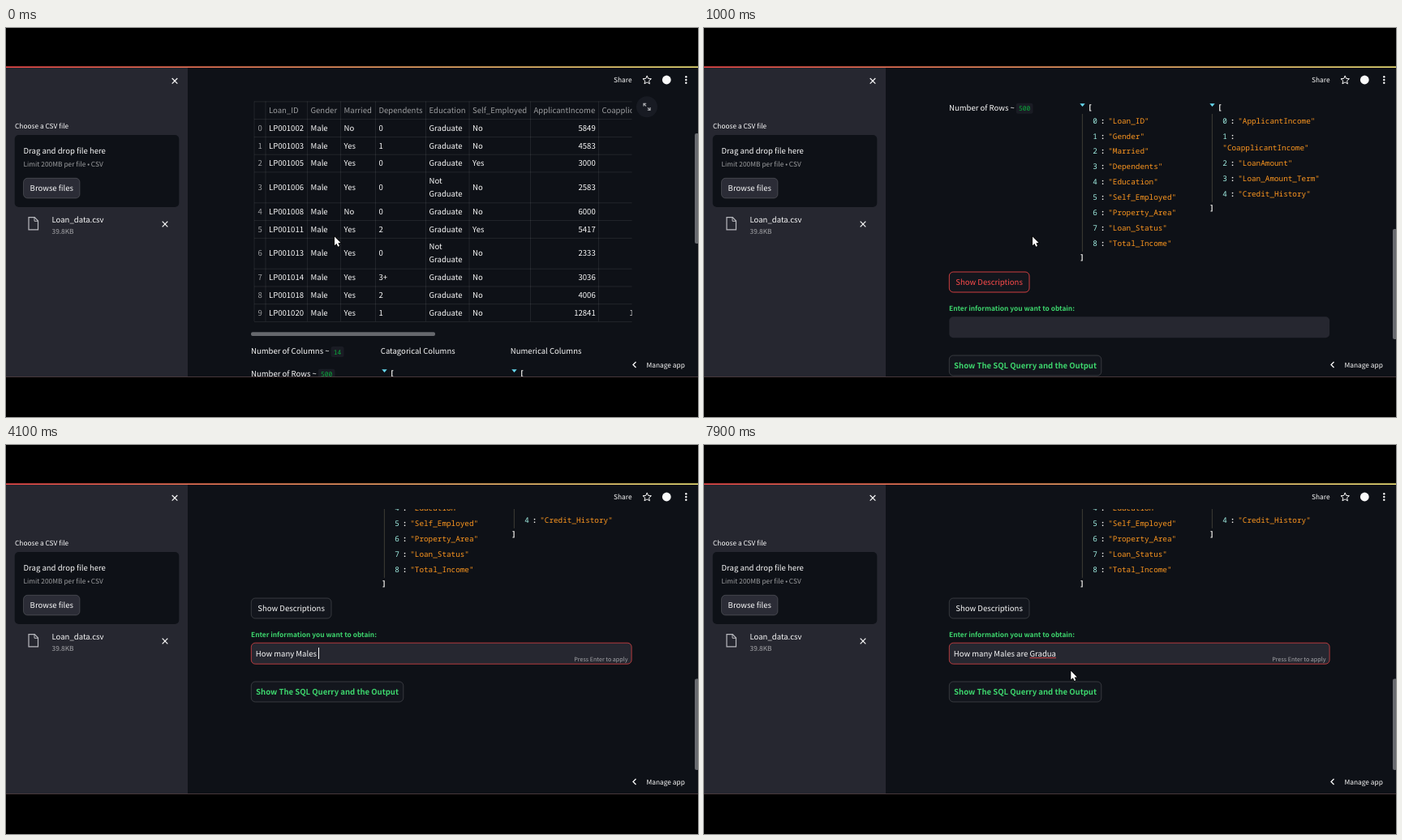
Write an HTML page with a canvas that moves like this. It is 853x480 px and loops after 8000 ms.

```html
<!DOCTYPE html>
<html lang="en">
<head>
<meta charset="utf-8">
<title>Loan data explorer</title>
<style>
html, body { margin: 0; width: 100%; height: 100%; overflow: hidden; background: #000; }
canvas { display: block; }
</style>
</head>
<body>
<canvas id="stage" width="853" height="480"></canvas>
<script>
const ctx = document.getElementById('stage').getContext('2d');
const LOOP = 8000, STEP = 100;
const SANS = '"Noto Sans CJK JP", "Noto Sans CJK SC", "Noto Sans CJK", "Noto Sans", sans-serif';
const MONO = '"Noto Sans Mono", "DejaVu Sans Mono", monospace';
const BODY = 9.55, SMALL = 8.36, TINY = 7.16;
const WHITE = '#fafafa', FAINT = 'rgba(250,250,250,.6)', EDGE = 'rgba(250,250,250,.2)';
const PAGE = '#0e1117', PANEL = '#262730', GREEN = '#3dd56d', RED = '#ff4b4b';

const SCROLL = [[100, 0], [400, 67], [700, 171.5], [1000, 328], [1250, 420], [1400, 440]];
const CLICK = 1500, UNDERLINE = 7100, POINTER_BACK = 7900;
const TYPED = [
  [CLICK, ''], [2000, 'H'], [2200, 'Ho'], [2300, 'How'], [2400, 'How '], [2600, 'How ma'],
  [2700, 'How man'], [2800, 'How many'], [2900, 'How many '], [3300, 'How many M'],
  [3500, 'How many Ma'], [3700, 'How many Mal'], [3900, 'How many Male'], [4100, 'How many Males '],
  [4300, 'How many Males a'], [4500, 'How many Males ar'], [4600, 'How many Males are'],
  [4700, 'How many Males are '], [4800, 'How many Males are g'], [5000, 'How many Males are '],
  [5700, 'How many Males are G'], [5800, 'How many Males are Gr'], [6000, 'How many Males are Gra'],
  [6200, 'How many Males are Grad'], [6300, 'How many Males are Gradua']
];

const COLUMNS = [306, 320, 371.5, 412.5, 455.5, 517.5, 571, 646.5, 730.5];
const HEADS = ['', 'Loan_ID', 'Gender', 'Married', 'Dependents', 'Education', 'Self_Employed', 'ApplicantIncome', 'CoapplicantIncome'];
const ROWS = [
  '02 No 0 G No 5849', '03 Yes 1 G No 4583', '05 Yes 0 G Yes 3000', '06 Yes 0 N No 2583',
  '08 No 0 G No 6000', '11 Yes 2 G Yes 5417', '13 Yes 0 N No 2333', '14 Yes 3+ G No 3036',
  '18 Yes 2 G No 4006', '20 Yes 1 G No 12841'
].map(row => row.split(' '));
const CATEGORICAL = ['Loan_ID', 'Gender', 'Married', 'Dependents', 'Education', 'Self_Employed', 'Property_Area', 'Loan_Status', 'Total_Income'];
const NUMERICAL = ['ApplicantIncome', 'CoapplicantIncome', 'LoanAmount', 'Loan_Amount_Term', 'Credit_History'];

// y is the middle of the capitals
function text(str, x, y, { size = BODY, color = WHITE, align = 'left', weight = 400, family = SANS } = {}) {
  ctx.font = `${weight} ${size}px ${family}`;
  ctx.textRendering = 'geometricPrecision';
  ctx.textAlign = align;
  ctx.fillStyle = color;
  ctx.fillText(str, x, y + (family === SANS ? size * .38 : size * .33));
  return ctx.measureText(str).width;
}

function rect(x, y, w, h, color) {
  ctx.fillStyle = color;
  ctx.fillRect(x, y, w, h);
}

function box(x, y, w, h, fill, edge, radius = 5) {
  ctx.beginPath();
  ctx.roundRect(x, y, w, h, radius);
  ctx.fillStyle = fill;
  ctx.fill();
  if (edge) stroke(edge, .8);
}

function stroke(color, width) {
  ctx.strokeStyle = color;
  ctx.lineWidth = width;
  ctx.stroke();
}

function path(points, close) {
  ctx.beginPath();
  points.forEach(([x, y]) => ctx.lineTo(x, y));
  if (close) ctx.closePath();
}

function line(points, color = WHITE, width = 1.2) {
  path(points);
  stroke(color, width);
}

function disc(x, y, r, color) {
  ctx.beginPath();
  ctx.arc(x, y, r, 0, 2 * Math.PI);
  ctx.fillStyle = color;
  ctx.fill();
}

function cross(x, y) {
  const r = 3.3;
  line([[x - r, y - r], [x + r, y + r]]);
  line([[x - r, y + r], [x + r, y - r]]);
}

function scrollAt(t) {
  if (t <= SCROLL[0][0]) return 0;
  for (let i = 1; i < SCROLL.length; i++) {
    const [t0, s0] = SCROLL[i - 1], [t1, s1] = SCROLL[i];
    if (t <= t1) return s0 + (s1 - s0) * (t - t0) / (t1 - t0);
  }
  return SCROLL[SCROLL.length - 1][1];
}

function drawSidebar() {
  rect(0, 49, 224, 381, PANEL);
  cross(208, 65.3);
  text('Choose a CSV file', 11, 121.3, { size: SMALL });
  box(10.7, 132, 202.6, 89, PAGE);
  text('Drag and drop file here', 21.5, 151);
  text('Limit 200MB per file • CSV', 21.5, 168, { size: SMALL, color: FAINT });
  box(21.5, 185.3, 69.5, 24.7, '#2b2c36', EDGE);
  text('Browse files', 56.3, 197.4, { align: 'center' });
  path([[28, 233.7], [35.3, 233.7], [39.5, 238], [39.5, 248.8], [28, 248.8]], true);
  stroke('#b9babf', 1.2);
  line([[35, 233.7], [35, 238.3], [39.5, 238.3]], '#b9babf', 1);
  text('Loan_data.csv', 56.5, 236);
  text('39.8KB', 56.5, 251, { size: SMALL, color: FAINT });
  cross(196, 242);
}

function drawTable(hovered) {
  const top = 90.5, single = 21.75, double = 37.9, edge = 'rgba(250,250,250,.1)';
  const left = i => COLUMNS[i] + 4;
  ctx.save();
  ctx.beginPath();
  ctx.rect(302, top - 1, 469.5, 274);
  ctx.clip();
  HEADS.forEach((head, i) => text(head, left(i), top + 10.9, { color: FAINT }));
  rect(306, top, 480, .8, edge);
  let y = top + single;
  ROWS.forEach(([id, married, dependents, degree, employed, income], i) => {
    const height = degree === 'N' ? double : single, mid = y + height / 2;
    rect(306, y, 480, .8, edge);
    text(i, 315.8, mid, { color: FAINT, align: 'right' });
    ['LP0010' + id, 'Male', married, dependents].forEach((cell, c) => text(cell, left(c + 1), mid));
    if (degree === 'N') {
      text('Not', left(5), mid - 8);
      text('Graduate', left(5), mid + 8);
    } else {
      text('Graduate', left(5), mid);
    }
    text(employed, left(6), mid);
    text(income, 726.7, mid, { align: 'right' });
    if (i === 9) text('10968', 768.5, mid);
    y += height;
  });
  rect(306, y, 480, .8, edge);
  COLUMNS.forEach(x => rect(x - .4, top, .8, y - top, edge));
  ctx.restore();
  if (!hovered) return;
  box(302, 375.3, 227, 4.6, '#66686d', null, 2);
  disc(790, 97.3, 13, '#181b23');
  for (const d of [-1, 1]) {
    const tip = [790 + 4 * d, 97.3 + 4 * d];
    line([[790 + d, 97.3 + d], tip], '#bfc0c4', 1.1);
    line([[tip[0] - 3.2 * d, tip[1]], tip, [tip[0], tip[1] - 3.2 * d]], '#bfc0c4', 1.1);
  }
}

function drawBadge(value, x, y) {
  const width = String(value).length * 4.8 + 6.4;
  box(x, y - 6.5, width, 13, '#1a1c24', null, 2.5);
  text(value, x + 3.2, y + .5, { size: 8, color: '#09ab3b', family: MONO });
}

function drawList(names, x, y) {
  const mono = { size: 9.33, family: MONO };
  const bold = { ...mono, weight: 700, color: '#f9f8f5' };
  path([[x + 1.3, y - 4.3], [x + 7.7, y - 4.3], [x + 4.5, y - .6]], true);
  ctx.fillStyle = '#66d9ef';
  ctx.fill();
  text('[', x + 11, y, bold);
  let row = y + 17;
  names.forEach((name, i) => {
    text(i, x + 17.3, row, { ...mono, color: '#a1efe4' });
    text(':', x + 26.7, row, bold);
    const wraps = name === 'CoapplicantIncome';
    if (wraps) row += 14.6;
    text(`"${name}"`, x + (wraps ? 17.3 : 36.2), row, { ...mono, color: '#fd971f' });
    row += 18.93;
  });
  rect(x + 3.9, y + 8.5, .8, row - y - 17.5, '#49483e');
  text(']', x + 1.3, row - 2, bold);
}

function drawInput(t) {
  const focus = Math.min(1, Math.max(0, (t - CLICK) / 200));
  box(302.3, 684.2, 468.8, 26, PANEL, focus ? `rgba(255,75,75,${focus * .85})` : null);
  if (t < CLICK) return;
  const [since, typed] = TYPED.filter(([at]) => at <= t).pop();
  const x = 307.7, mid = 697;
  const width = text(typed, x, mid);
  if (typed) text('Press Enter to apply', 766.5, 703.8, { size: TINY, color: FAINT, align: 'right' });
  if (t >= UNDERLINE) {
    ctx.font = `400 ${BODY}px ${SANS}`;
    const start = x + ctx.measureText('How many Males are ').width;
    rect(start, 702.2, x + width - start, 1, '#d8474a');
  }
  const shown = Math.floor((t - since) / 500) % 2 === 0;
  if (shown) rect(Math.round(x + width), 690, 1, 14, t < CLICK + 200 ? '#b0b1b5' : WHITE);
}

function drawPage(t, scroll) {
  ctx.save();
  ctx.beginPath();
  ctx.rect(224, 79, 624, 351);
  ctx.clip();
  ctx.translate(0, -scroll);
  drawTable(scroll < 122);
  text('Number of Columns ~', 302, 398.8);
  drawBadge(14, 400.6, 399.4);
  text('Number of Rows ~', 302, 426.3);
  drawBadge(500, 384.7, 427.2);
  text('Catagorical Columns', 461.8, 398.8);
  text('Numerical Columns', 621.8, 398.8);
  drawList(CATEGORICAL, 462, 425.5);
  drawList(NUMERICAL, 622, 425.5);
  const focused = t < CLICK;
  box(302.3, 629, 98.7, 25, '#13161d', focused ? RED : EDGE);
  text('Show Descriptions', 351.6, 641.3, { align: 'center', color: focused ? RED : WHITE });
  text('Enter information you want to obtain:', 302, 673.4, { size: SMALL, color: GREEN, weight: 600 });
  drawInput(t);
  box(302.3, 732, 187.5, 25, '#13161d', EDGE);
  text('Show The SQL Querry and the Output', 396, 744, { align: 'center', color: GREEN, weight: 600 });
  ctx.restore();
}

function drawChrome(scroll) {
  text('Share', 749, 64, { size: SMALL });
  path(Array.from({ length: 10 }, (_, i) => {
    const r = i % 2 ? 2.5 : 5.5, a = (i / 5 - .5) * Math.PI;
    return [790.2 + r * Math.cos(a), 64.4 + r * Math.sin(a)];
  }), true);
  stroke(WHITE, 1);
  disc(814.3, 64, 5.4, WHITE);
  [-3.8, 0, 3.8].forEach(d => disc(838.3, 64 + d, 1.2, WHITE));
  line([[776.5, 412], [773, 415.5], [776.5, 419]], WHITE, 1.3);
  text('Manage app', 789.5, 415.6, { size: SMALL });
  const top = 130 + scroll * .36;
  box(849, top, 5, Math.min(top + 136, 401) - top, '#696b70', null, 2);
  const glow = ctx.createLinearGradient(0, 0, 853, 0);
  glow.addColorStop(0, '#f04b4b');
  glow.addColorStop(1, '#f5e87a');
  rect(0, 47.4, 853, 1.6, glow);
  rect(0, 430, 853, 1, '#47383b');
}

function drawPointer(x, y) {
  path([[0, 0], [0, 10.8], [2.5, 8.5], [4.2, 12.3], [6, 11.5], [4.3, 7.8], [7.5, 7.6]]
    .map(([dx, dy]) => [x + dx, y + dy]), true);
  stroke('#000', 1.2);
  ctx.fillStyle = '#fff';
  ctx.fill();
}

function draw(now) {
  const t = Math.floor(now % LOOP / STEP) * STEP;
  const scroll = scrollAt(t);
  rect(0, 0, 853, 480, '#000');
  rect(0, 48, 853, 382, PAGE);
  drawSidebar();
  drawPage(t, scroll);
  drawChrome(scroll);
  // the arrow is hidden while it rests over the text field
  if (scroll < 426) drawPointer(405, 257.5);
  else if (t >= POINTER_BACK) drawPointer(452.3, 278.8);
}

const start = performance.now();
function tick() {
  draw(performance.now() - start);
  requestAnimationFrame(tick);
}
tick();
</script>
</body>
</html>
```
